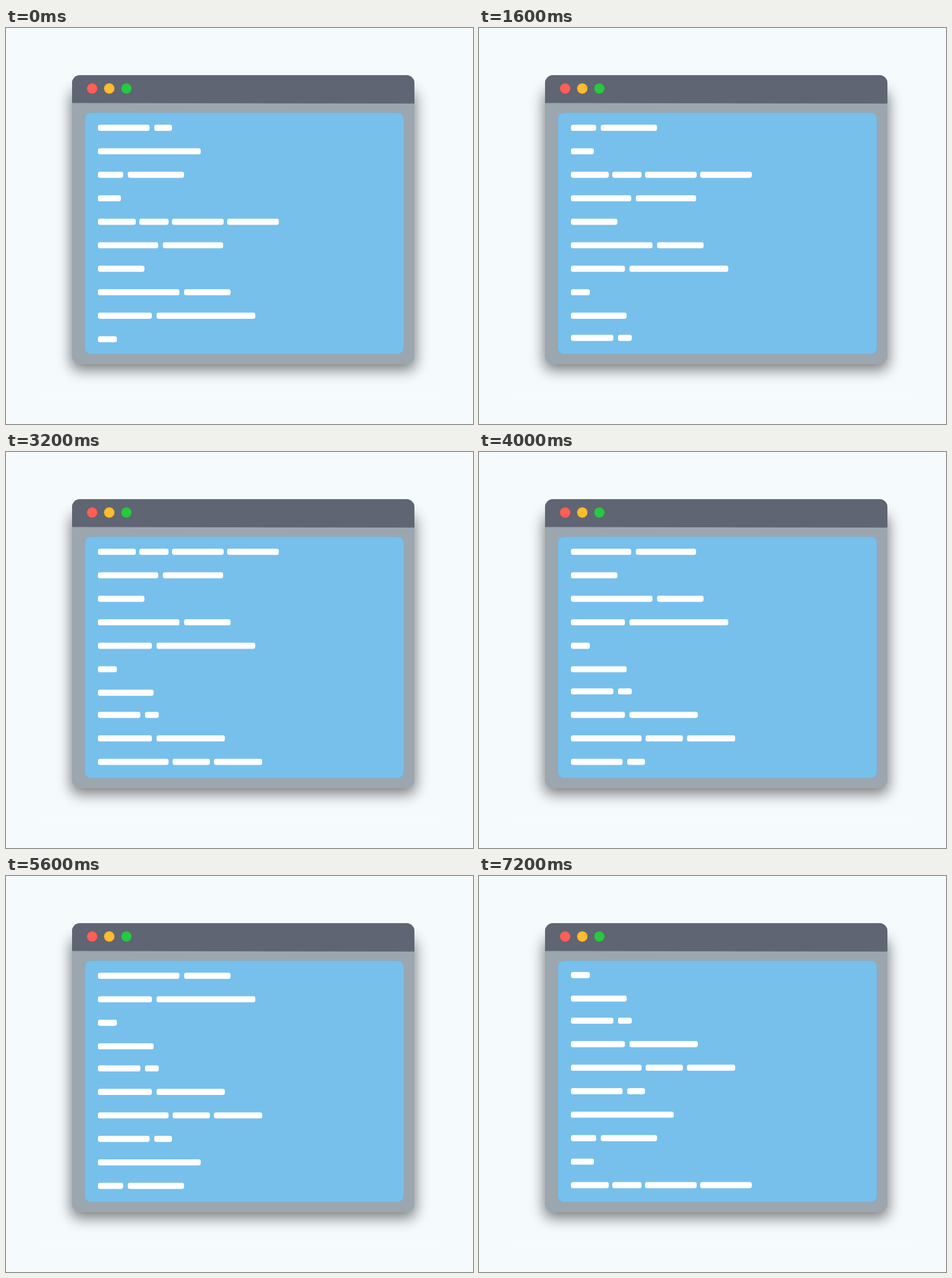
An HTML page for the animation above (8000 ms loop, 813 by 689 pixels).

```html
<!DOCTYPE html>
<html lang="en">
<head>
<meta charset="utf-8">
<title>Scrolling code window</title>
<style>
html, body { margin: 0; width: 100%; height: 100%; overflow: hidden; background: #f5fafd; }
svg { display: block; width: 100%; height: 100%; }
</style>
</head>
<body>
<svg viewBox="0 0 813 689">
  <defs>
    <filter id="soft" x="-15%" y="-15%" width="130%" height="130%">
      <feGaussianBlur stdDeviation="12.5"/>
    </filter>
  </defs>
  <rect width="813" height="689" fill="#f5fafd"/>
  <path d="M48 637H759.5V44" fill="none" stroke="#f8fcfe" stroke-width="1.5"/>
  <rect x="113" y="109" width="600" height="486" rx="14" fill="#000" opacity=".5" filter="url(#soft)"/>
  <rect x="115" y="82" width="596" height="503" rx="14" fill="#9ca6af"/>
  <path d="M115 130.6V96a14 14 0 0 1 14-14H697a14 14 0 0 1 14 14V131.6Z" fill="#5f6572"/>
  <g id="buttons" stroke="#000" stroke-opacity=".1"></g>
  <rect x="137.5" y="147.5" width="555" height="419.5" rx="10" fill="#77c0ec" stroke="#74b2d8" stroke-width=".8"/>
  <g id="code" fill="#fff"></g>
</svg>
<script>
const STEP = 800, STEPS = 10, ROWS = 10;
const LEFT = 160, TOP = 168.3, PITCH = 40.88;
const TIGHT = 11, NUDGE = 2.4; // one line sits closer to the line above it

// Bar widths of each line
const lines = ['90 31', '179', '44 98', '40', '66 51 90 90', '105 105', '81',
  '142 81', '94 172', '33', '97', '74 24', '94 119', '123 65 84']
  .map(s => s.split(' ').map(Number));

const byId = id => document.getElementById(id);

byId('buttons').innerHTML = ['#ff5f57', '#febc2e', '#28c840']
  .map((fill, i) => `<circle cx="${150 + i * 29.8}" cy="105.3" r="9.2" fill="${fill}"/>`).join('');

const lineY = n => n * PITCH - (n >= TIGHT ? NUDGE : 0);
// The scroll takes up the tight line's offset over the two steps before it
const scrollY = n => n * PITCH + Math.max(0, n - TIGHT + 3) * NUDGE / 2;

function drawLine(n, y) {
  const bars = lines[n % lines.length], gap = 10 - bars.length;
  let x = LEFT, out = '';
  for (const w of bars) {
    out += `<rect x="${x}" y="${y.toFixed(2)}" width="${w}" height="10.6" rx="3.6"/>`;
    x += w + gap;
  }
  return out;
}

let shown = -1;
function draw(ms) {
  const first = Math.floor(ms / STEP) % STEPS;
  if (first === shown) return;
  shown = first;
  let out = '';
  for (let n = first; n < first + ROWS; n++) out += drawLine(n, TOP + lineY(n) - scrollY(first));
  byId('code').innerHTML = out;
}

const start = performance.now();
function tick() {
  draw(performance.now() - start);
  requestAnimationFrame(tick);
}
tick();
</script>
</body>
</html>
```
